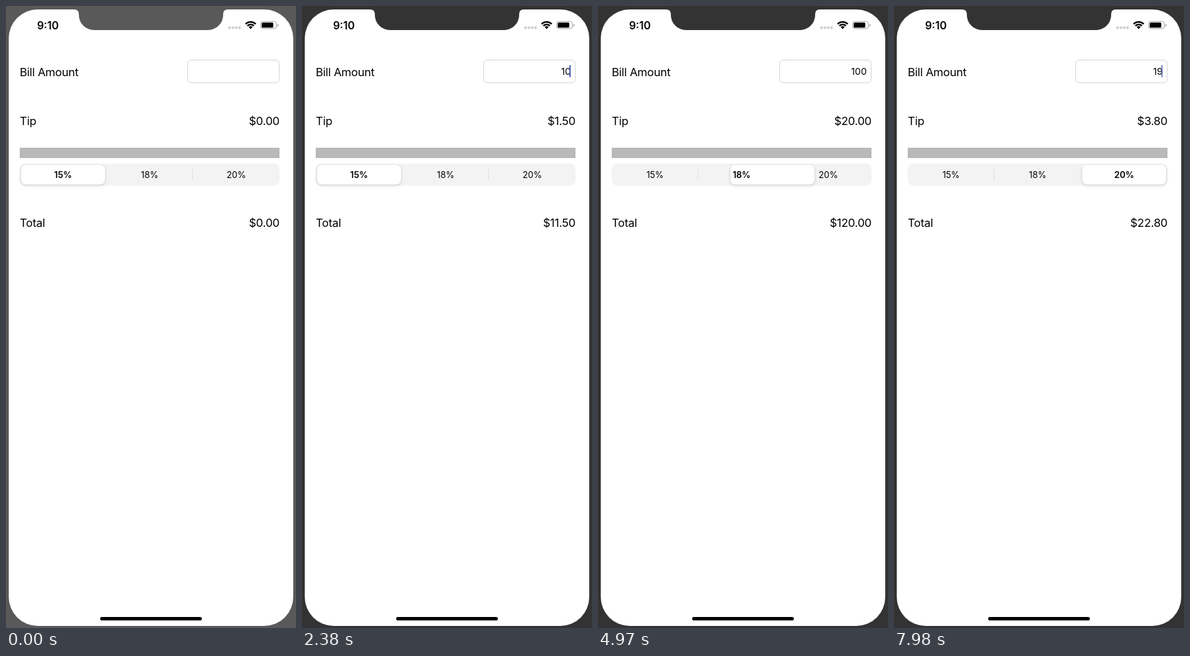
Animation of 422 by 904 pixels, one loop 8000 ms. Source, as an HTML page with a canvas:

```html
<!DOCTYPE html>
<html lang="en">
<head>
<meta charset="utf-8">
<title>Tip calculator</title>
<style>
html, body { margin: 0; width: 100%; height: 100%; overflow: hidden; background: #333; }
canvas, svg { position: absolute; left: 0; top: 0; width: 422px; height: 904px; }
text { font-family: Inter, "Liberation Sans", sans-serif; fill: #000; }
.label { font-size: 16.5px; letter-spacing: -0.25px; }
.field { font-size: 13.7px; letter-spacing: -0.05px; }
.seg { font-size: 12.7px; text-anchor: middle; }
.end { text-anchor: end; }
.clock { font-size: 15.5px; font-weight: 600; text-anchor: middle; }
</style>
</head>
<body>
<canvas id="stage" width="422" height="904"></canvas>
<svg viewBox="0 0 422 904">
  <text class="clock" x="61" y="33.5">9:10</text>
  <text class="label" x="20" y="102">Bill Amount</text>
  <text class="label" x="20" y="173">Tip</text>
  <text class="label" x="20" y="321">Total</text>
  <text class="field end" id="bill" x="391" y="99.5"></text>
  <text class="label end" id="tip" x="398" y="173"></text>
  <text class="label end" id="total" x="398" y="321"></text>
  <text class="seg" x="83" y="249.5">15%</text>
  <text class="seg" x="209" y="249.5">18%</text>
  <text class="seg" x="335" y="249.5">20%</text>
  <rect id="caret" x="389" y="86" width="2" height="17.5" fill="#5468b4"/>
</svg>
<script>
const LOOP = 8000;
const ctx = document.getElementById('stage').getContext('2d');
const [bill, tip, total, caret] = ['bill', 'tip', 'total', 'caret'].map(id => document.getElementById(id));
const segs = document.querySelectorAll('.seg');
const rates = [15, 18, 20];

const typed = [[0, ''], [2030, '1'], [2310, '10'], [2940, '100'], [5670, '10'], [7210, '1'], [7490, '19']];
const taps = [{ seg: 1, down: 3790, up: 3990 }, { seg: 2, down: 4650, up: 4830 }];
const blink = [
  [1750, 0], [1890, 1], [3450, 1], [3640, 0], [3850, 0], [4060, 1], [4450, 1], [4690, 0],
  [4970, 0], [5110, 1], [6310, 1], [6510, 0], [6790, 0], [6930, 1], [7930, 1], [8120, 0]
];

const clamp = v => Math.min(1, Math.max(0, v));
const smooth = v => v * v * (3 - 2 * v);
const money = v => '$' + v.toFixed(2);

function track(keys, t) {
  const i = keys.findIndex(k => k[0] > t);
  if (i === 0) return keys[0][1];
  const [t0, a] = keys[i - 1], [t1, b] = keys[i];
  return a + (b - a) * (t - t0) / (t1 - t0);
}

function box(x, y, w, h, r, fill) {
  ctx.beginPath();
  ctx.roundRect(x, y, w, h, r);
  ctx.fillStyle = fill;
  ctx.fill();
}

function outline(x, y, w, h, r, color) {
  ctx.beginPath();
  ctx.roundRect(x, y, w, h, r);
  ctx.lineWidth = 1;
  ctx.strokeStyle = color;
  ctx.stroke();
}

function drawPhone(t) {
  const bezel = t < 1120 ? '#595959' : '#333';
  ctx.fillStyle = bezel;
  ctx.fillRect(0, 0, 422, 904);
  box(4, 5, 414, 896, 42, '#fff');

  ctx.beginPath();
  ctx.moveTo(99, 4);
  ctx.lineTo(99, 5);
  ctx.quadraticCurveTo(106, 5, 106, 12);
  ctx.arcTo(106, 35, 129, 35, 22);
  ctx.arcTo(316, 35, 316, 12, 22);
  ctx.lineTo(316, 12);
  ctx.quadraticCurveTo(316, 5, 323, 5);
  ctx.lineTo(323, 4);
  ctx.fillStyle = bezel;
  ctx.fill();

  box(137, 888, 148, 5, 2.5, '#000');
}

function drawStatus() {
  for (let i = 0; i < 4; i++) box(323.3 + i * 4.9, 29.6, 3.8, 3.8, 1.9, '#cbcbcb');

  const from = -Math.PI * 0.75, to = -Math.PI * 0.25;
  ctx.strokeStyle = ctx.fillStyle = '#000';
  ctx.lineWidth = 2.3;
  for (const r of [10.4, 6.6]) {
    ctx.beginPath();
    ctx.arc(356, 33.5, r, from, to);
    ctx.stroke();
  }
  ctx.beginPath();
  ctx.moveTo(356, 33.5);
  ctx.arc(356, 33.5, 3.9, from, to);
  ctx.fill();

  outline(370.5, 22.5, 23, 10.5, 3, '#a6a6a6');
  box(372, 24, 17, 7.5, 1.6, '#000');
  box(395, 26, 1.4, 3.6, 0.7, '#a6a6a6');
}

function drawForm(pos) {
  outline(264.5, 78.5, 133, 33, 5, '#d5d5d5');
  box(20, 206, 378, 15, 0, '#b9b9b9');
  box(20, 229, 378, 32, 8, '#f3f3f3');

  // A divider shows only when the pill is clear of it
  [145, 271].forEach((x, i) => {
    ctx.globalAlpha = clamp(Math.abs(pos - i - 0.5) * 2 - 1);
    box(x, 237, 1, 16, 0, '#dedede');
  });
  ctx.globalAlpha = 1;

  const x = 22 + 126 * pos;
  ctx.save();
  ctx.shadowColor = 'rgba(0,0,0,.16)';
  ctx.shadowBlur = 5;
  ctx.shadowOffsetY = 1.5;
  box(x, 231, 122, 28.5, 7, '#fff');
  ctx.restore();
}

function setText(node, value) {
  if (node.textContent !== value) node.textContent = value;
}

function render(t) {
  const amount = typed.filter(k => k[0] <= t).pop()[1];
  const pos = taps.reduce((sum, tap) => sum + smooth(clamp((t - tap.up) / 350)), 0);
  const chosen = taps.filter(tap => t >= tap.up).length;
  const tipValue = amount * rates[chosen] / 100;

  drawPhone(t);
  drawStatus();
  drawForm(pos);

  setText(bill, amount);
  setText(tip, money(tipValue));
  setText(total, money(+amount + tipValue));
  caret.setAttribute('opacity', track(blink, t));

  segs.forEach((node, i) => {
    const tap = taps.find(p => p.seg === i);
    const press = tap ? clamp((t - tap.down) / 200) * (1 - clamp((t - tap.up) / 140)) : 0;
    node.setAttribute('opacity', 1 - 0.65 * press);
    node.setAttribute('font-weight', Math.round(pos) === i ? 600 : 400);
  });
}

function tick() {
  render(performance.now() % LOOP);
  requestAnimationFrame(tick);
}
tick();
</script>
</body>
</html>
```
